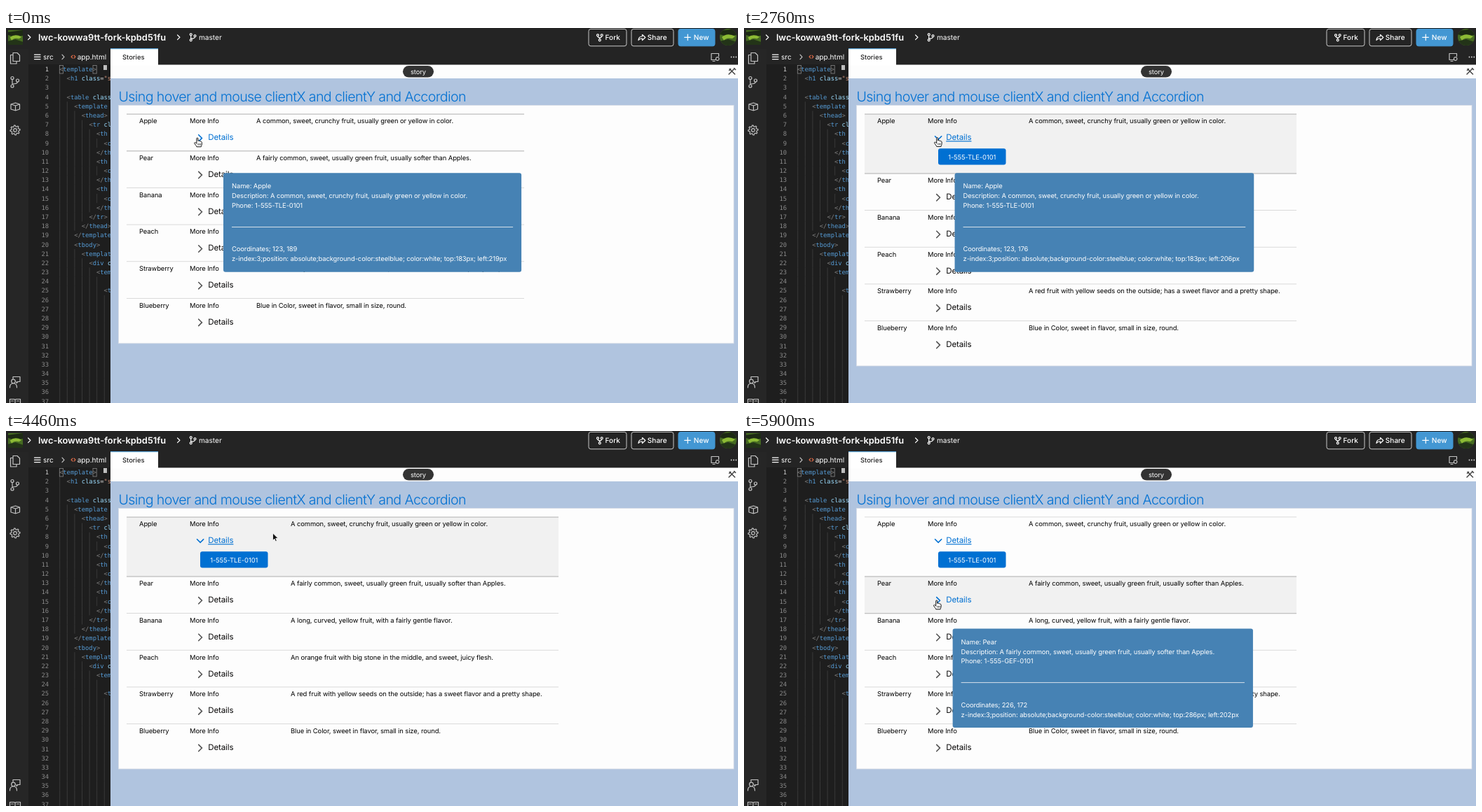
Recreate the animation shown at these times as an HTML page. Size 1044 by 536 pixels, loop 8000 ms.

```html
<!DOCTYPE html>
<html lang="en">
<head>
<meta charset="utf-8">
<title>Accordion table</title>
<style>
html, body { margin: 0; width: 100%; height: 100%; overflow: hidden; background: #b0c4df; }
svg { display: block; width: 1044px; height: 536px; font-family: Inter, sans-serif; font-optical-sizing: none; text-rendering: geometricPrecision; }
text { white-space: pre; }
.ui { font-size: 10.1px; fill: #fff; }
.body { font-size: 9.4px; letter-spacing: -.08px; }
.head { font-size: 11.5px; letter-spacing: -.1px; }
.code { font-family: "DejaVu Sans Mono", monospace; font-size: 8.8px; }
.icon { fill: none; stroke: #c4c4c4; stroke-width: 1.2; stroke-linejoin: round; stroke-linecap: round; }
</style>
</head>
<body>
<svg id="stage" viewBox="0 0 1044 536" xmlns="http://www.w3.org/2000/svg">
  <g id="editor"></g>
  <g id="frame"></g>
  <g id="page"></g>
  <g id="tip"></g>
  <g id="hand" stroke="#111" stroke-width="1" stroke-linejoin="round">
    <path fill="#fff" d="M-1.6 .9C-1.6-.3 .4-.3 .4 .9V4.4c.5-.7 1.9-.5 2 .4 .5-.6 1.7-.3 1.8 .6 .6-.4 1.6 0 1.6 1V9c0 1.5-.8 2-1 3.8H-1.6C-1.8 11.4-4 9.4-4.8 7.6-5 6.6-3.6 6.2-2.9 7L-1.6 8.2Z"/>
    <path fill="none" stroke-width=".7" d="M.4 8v2.6M2.2 8v2.6M3.9 8v2.6"/>
  </g>
  <path id="arrow" fill="#111" stroke="#fff" stroke-width=".8" d="M0 0V10.5L2.4 8.2 4 11.8 5.8 11 4.2 7.5H7.6Z"/>
</svg>
<script>
const LOOP = 8000;
const $ = id => document.getElementById(id);
const esc = s => s.replace(/&/g, '&amp;').replace(/</g, '&lt;').replace(/>/g, '&gt;');
const text = (x, y, s, cls, more = '') => `<text x="${x}" y="${y}" class="${cls}" ${more}>${esc(s)}</text>`;
const rect = (x, y, w, h, fill, more = '') => `<rect x="${x}" y="${y}" width="${w}" height="${h}" fill="${fill}" ${more}/>`;
const icon = (d, more = '') => `<path class="icon" d="${d}" ${more}/>`;
const ring = (x, y, r) => `M${x - r} ${y}a${r} ${r} 0 1 0 ${2 * r} 0a${r} ${r} 0 1 0 ${-2 * r} 0`;

// ---- code editor ----
const CODE = `<template>
  <h1 class="s

  <table class
    <template f
      <thead>
        <tr cl
          <th c
            <c
          </th
          <th c
            <c
          </th
          <th c
            <c
          </th
        </tr>
      </thead>
    </template
    <tbody>
      <templat
        <div c
          <tem

            <t`.split('\n');
const CHAR = 5.298, LINE = 13.18;

function codeLine(src) {
  const span = (s, color) => s ? `<tspan fill="${color}">${esc(s)}</tspan>` : '';
  const [, open, tag, attr, eq, str, close] = src.match(/^(<\/?)(\w*)( \w*)?(=)?("\w*)?(>)?/);
  return span(open, '#808080') + span(tag, '#569cd6') + span(attr, '#9cdcfe') +
    span(eq, '#d4d4d4') + span(str, '#ce9178') + span(close, '#808080');
}

function buildEditor() {
  let out = rect(0, 0, 1044, 536, '#242424') + rect(32, 52, 117, 484, '#1e1e1e') + rect(0, 30, 32, 506, '#262626');
  let guides = '';
  for (let i = 0; i < 37; i++) {
    const y = 62.1 + i * LINE, src = CODE[i] || '', body = src.trim();
    const indent = src.length - body.length;
    out += text(61, y, String(i + 1), 'code', `text-anchor="end" fill="${i ? '#8a8a8a' : '#d0d0d0'}"`);
    if (body) out += `<text class="code" x="${76 + indent * CHAR}" y="${y}">${codeLine(body)}</text>`;
    const depth = body ? indent / 2 : i < 20 ? 1 : i < 24 ? 6 : 7;
    for (let k = 0; k < depth; k++) guides += `M${76.7 + k * 2 * CHAR} ${y - 9.6}v${LINE}`;
  }
  out += `<path d="${guides}" stroke="#414141" stroke-width=".8"/>`;
  for (const x of [76.3, 124]) out += rect(x, 53.5, 5.2, 11.5, 'none', 'stroke="#888" stroke-width=".8"');
  out += rect(139, 53, 5, 7, '#bdbdbd');

  out += icon('M40.5 38.2h8.5M40.5 41.4h8.5M40.5 44.6h8.5', 'style="stroke:#fff"') + text(53, 45, 'src', 'ui');
  out += icon('M80 38.2l3 3.2-3 3.2') + icon('M95 39.2l-2 2 2 2M97 39.2l2 2-2 2', 'style="stroke:#e8704a"');
  return out + text(101.7, 45, 'app.html', 'ui');
}

// ---- top bar, side bar and preview chrome ----
function buildFrame() {
  const branch = (x, y) => ring(x - 2.8, y - 4, 1.5) + ring(x - 2.8, y + 4, 1.5) + ring(x + 3, y - 2, 1.5) +
    `M${x - 2.8} ${y - 2.5}v5M${x + 3} ${y - .5}q0 2.5-5.8 2.5`;
  const white = 'style="stroke:#fff"';
  const photo = rect(0, 0, 24, 24, '#466b22') + '<path d="M0 3L24 0V9L10 11 0 8Z" fill="#1d2a14"/>' +
    '<path d="M3 12Q11 5 22 11L18 14Q9 12 6 17Z" fill="#8dbb35"/><path d="M0 18L12 15 24 19V24H0Z" fill="#233418"/>';
  let out = `<svg x="3" y="3" width="21" height="21" viewBox="0 0 24 24">${photo}</svg>` +
    `<clipPath id="disc"><circle cx="12" cy="12" r="12"/></clipPath><g transform="translate(1018 1)" clip-path="url(#disc)">${photo}</g>`;
  out += icon('M31.5 10l3.4 3.3-3.4 3.3M244.5 10l3.4 3.3-3.4 3.3', white) + icon(branch(266.5, 13.3), white);
  out += text(46, 18.2, 'lwc-kowwa9tt-fork-kpbd51fu', '', 'fill="#fff" font-size="12.85" font-weight="600"');
  out += text(275, 17.3, 'master', 'ui');

  const button = (x, w, fill, stroke, tx, label) =>
    rect(x, 1.5, w, 24.3, fill, `rx="3" stroke="${stroke}" stroke-width="1"`) + text(tx, 17.4, label, 'ui', 'font-weight="500"');
  out += button(831, 54, 'none', '#c8c8c8', 854.5, 'Fork') + button(892, 60, 'none', '#c8c8c8', 914.8, 'Share') +
    button(959, 52, '#4397d3', '#4397d3', 980.8, 'New');
  out += icon(ring(844, 10.3, 1.5) + ring(849.7, 10.3, 1.5) + ring(846.8, 17.3, 1.5) + 'M844 11.8q0 2 2.8 2t2.9-2M846.8 13.8v2', white);
  out += icon('M902 17.5q.3-5.5 5.5-5.5V9.5l4.3 4-4.3 4V15q-4 0-5.5 2.5Z', white) + icon('M967.7 13.3h8.6M972.3 9v8.6', white);

  out += icon('M10 35.5h6l3.5 3.5v8.5H10ZM10 38.5H6.5V51H15V47.5');
  out += icon(ring(9, 71.5, 2) + ring(9, 83, 2) + ring(16.5, 75, 2) + 'M9 73.5v7.5M16.5 77q0 3-7.5 3');
  out += icon('M7 109l6.5-2 6 2v7l-6 2-6.5-2ZM7 109l6.5 2 6-2M13.5 111v7');
  let cog = ring(13, 146, 2.3);
  for (let i = 0; i <= 32; i++) {
    const a = i / 16 * Math.PI, r = (i + 1) % 4 < 2 ? 7 : 5.2;
    cog += `${i ? 'L' : 'M'}${(13 + r * Math.cos(a)).toFixed(1)} ${(146 + r * Math.sin(a)).toFixed(1)}`;
  }
  out += icon(cog) + icon('M10 501v-2.5h10v7h-3l-2 2v-2' + ring(10.5, 505, 2.8) + 'M5.5 514q0-6 5-6t5 6');
  out += icon('M5.5 530.5h6l1.5 1 1.5-1h6V537M5.5 530.5V537M13 531.5V537M7.5 533h3M15.5 533h3');
  out += icon('M1012 45.5h-6v-9h10.5v4M1008 47.5h3' + ring(1014.7, 44, 2.3));
  for (let i = 0; i < 3; i++) out += `<circle cx="${1034.5 + i * 3.4}" cy="41.5" r=".9" fill="#ddd"/>`;

  out += rect(149, 52.5, 895, 20, '#fdfdfd') + rect(149, 29.5, 68, 24, '#fff') + rect(149, 29, 68, 1.2, '#5ba3d8');
  out += text(166, 45, 'Stories', '', 'font-size="9.4" font-weight="500" fill="#222"');
  out += rect(566, 54, 44, 16.6, '#333', 'rx="8.3"') + text(588, 65.8, 'story', 'body', 'text-anchor="middle" fill="#fff"');
  out += icon('M1032 58.5l7.5 7.5M1039 58l-8 8M1031.5 60.5l2-2M1038.5 57.5l2 2', 'style="stroke:#444;stroke-width:1.5"');
  out += rect(149, 72, 895, 464, '#b0c4df');
  return out + text(160.5, 104.7, 'Using hover and mouse clientX and clientY and Accordion', '',
    'font-size="19.6" font-weight="300" letter-spacing="-.6" fill="#0070d2"');
}

// ---- table and tooltip ----
const FRUIT = [
  ['Apple', 'A common, sweet, crunchy fruit, usually green or yellow in color.', '1-555-TLE-0101'],
  ['Pear', 'A fairly common, sweet, usually green fruit, usually softer than Apples.', '1-555-GEF-0101'],
  ['Banana', 'A long, curved, yellow fruit, with a fairly gentle flavor.'],
  ['Peach', 'An orange fruit with big stone in the middle, and sweet, juicy flesh.'],
  ['Strawberry', 'A red fruit with yellow seeds on the outside; has a sweet flavor and a pretty shape.'],
  ['Blueberry', 'Blue in Color, sweet in flavor, small in size, round.']
];
const BLUE = '#0070d2', PITCH = 52.7;

function drawPage({ open, row, onButton, onPear }) {
  const shift = open ? 32.2 : 0, width = open ? 616 : 567;
  const top = i => 123 + i * PITCH + (i ? shift : 0);
  let out = rect(160.5, 110.5, 877.5, 340.3 + shift, '#fdfdfd', 'stroke="#d8dde6" stroke-width=".8"');
  if (open) out += rect(172, top(row), width, top(row + 1) - top(row), '#f1f1f1');
  FRUIT.forEach(([name, about, phone], i) => {
    const y = top(i), down = open && i === 0;
    const dark = i === row || i === row + 1;
    const lit = i === 0 || (i === 1 && onPear);
    out += rect(172, y - .5, width, dark ? 1.2 : .9, dark ? '#bcbcbc' : '#d6d6d6');
    out += text(190, y + 13.3, name, 'body') + text(262, y + 13.3, 'More Info', 'body') + text(open ? 406 : 357, y + 13.3, about, 'body');
    out += text(288.2, y + 37.3, 'Details', 'head', `fill="${lit ? BLUE : '#080707'}" ${down ? 'text-decoration="underline"' : ''}`);
    const arrow = down ? `M272.5 ${y + 31.8}l4.6 4.6 4.6-4.6` : `M274.7 ${y + 29.7}l4.7 4.7-4.7 4.7`;
    out += `<path d="${arrow}" fill="none" stroke="${lit ? BLUE : '#555'}" stroke-width="1.6" stroke-linecap="round"/>`;
    if (down) out += rect(277, y + 49.2, 96.5, 23.4, onButton ? '#005fb2' : BLUE, 'rx="3"') +
      text(325.2, y + 64.5, phone, 'body', 'text-anchor="middle" fill="#fff"');
  });
  return out;
}

function drawTip([, who, cy, cx]) {
  if (who < 0) return '';
  const [name, about, phone] = FRUIT[who], top = cy + 60, left = cx + 30;
  const x = 310 + (left - 219) * .728, y = 207.2 + (top - 183) * .73;
  const count = d => `${top}${left}`.split(d).length - 1;
  const w = 428.3 - 1.6 * count('1') - 1.2 * count('7');
  const line = (dy, s) => text(x + 12, y + dy, s, 'body', 'fill="#fff"');
  return rect(x, y, w, 141.6, 'steelblue', 'rx="3"') +
    line(22.2, 'Name: ' + name) + line(36.2, 'Description: ' + about) + line(50, 'Phone: ' + phone) +
    rect(x + 12, y + 76.8, w - 24, .9, '#e6ebf0') +
    line(112.2, `Coordinates; ${cy}, ${cx}`) +
    line(126.2, `z-index:3;position: absolute;background-color:steelblue; color:white; top:${top}px; left:${left}px`);
}

// ---- timeline ----
// time, fruit index (-1 hides), clientY, clientX
const TIPS = [
  [0, 0, 123, 189], [1880, 0, 136, 176], [2665, 0, 123, 176], [4195, 0, 117, 205],
  [4284, 0, 112, 243], [4373, 0, 102, 313], [4460, -1],
  [5443, 0, 152, 269], [5534, 0, 185, 232], [5625, 1, 208, 205], [5716, 1, 219, 187], [5808, 1, 226, 172]
];
// first step, last step, step count, then [progress, x, y] along the way
const MOVES = [
  [290, 380, 2, [0, 273.5, 157], [1, 276, 157]],
  [1540, 2320, 10, [0, 276, 157], [.6, 278, 173], [1, 280, 178]],
  [2490, 2760, 4, [0, 280, 178], [1, 276.3, 156.6]],
  [4020, 4550, 7, [0, 276.3, 156.6], [2 / 7, 298, 156], [3 / 7, 325.6, 153], [4 / 7, 377.5, 146], [1, 386.5, 146]],
  [5170, 5900, 9, [0, 386.5, 146], [1 / 9, 386.5, 146], [2 / 9, 376, 155], [3 / 9, 344, 183], [5 / 9, 298, 224], [7 / 9, 276, 237], [1, 275.3, 242]]
];

function cursorAt(t) {
  const [a, b, n, ...path] = MOVES.filter(m => m[0] <= t).pop() || MOVES[0];
  const p = t < a ? 0 : Math.min(1, (Math.floor((t - a) / (b - a) * (n - 1) + 1e-6) + 1) / n);
  const i = Math.max(1, path.findIndex(k => k[0] >= p - 1e-9));
  const [p0, x0, y0] = path[i - 1], [p1, x1, y1] = path[i];
  const f = (p - p0) / (p1 - p0);
  return [x0 + (x1 - x0) * f, y0 + (y1 - y0) * f];
}

const shown = {};
function put(id, html) {
  if (shown[id] !== html) $(id).innerHTML = shown[id] = html;
}

function draw(t) {
  put('page', drawPage({
    open: t >= 830,
    row: t >= 5534 ? 1 : 0,
    onButton: t >= 1880 && t < 2665,
    onPear: t >= 5625
  }));
  put('tip', drawTip(TIPS.filter(k => k[0] <= t).pop()));
  const [x, y] = cursorAt(t), pointing = t < 4195 || t >= 5534;
  for (const id of ['hand', 'arrow']) {
    $(id).setAttribute('transform', `translate(${x} ${y})`);
    $(id).setAttribute('visibility', (id === 'hand') === pointing ? 'visible' : 'hidden');
  }
}

put('editor', buildEditor());
put('frame', buildFrame());
const start = performance.now();
function tick() {
  draw((performance.now() - start) % LOOP);
  requestAnimationFrame(tick);
}
tick();
</script>
</body>
</html>
```
